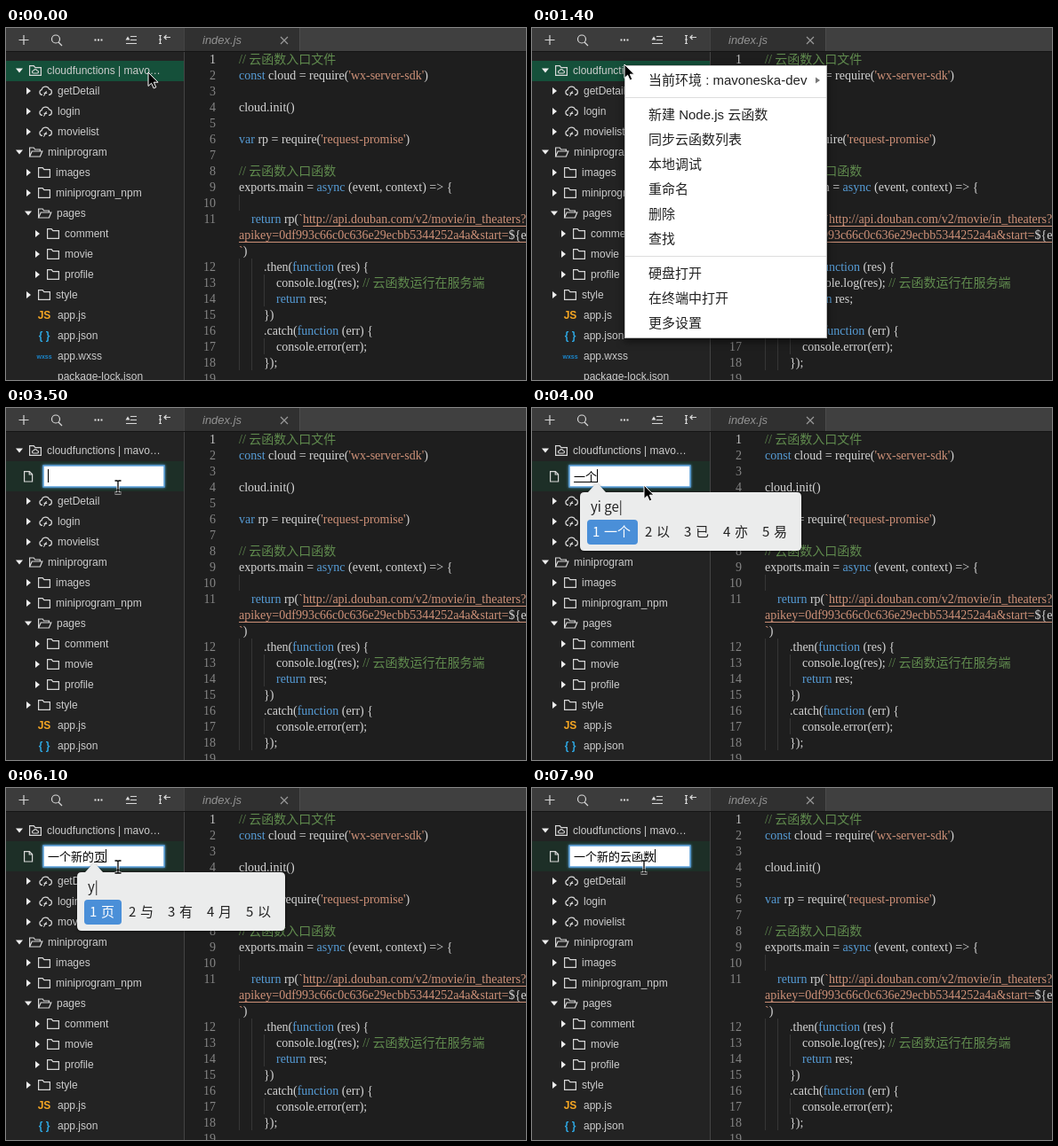
An HTML page that plays this animation: 585 by 397 pixels, repeating every 8000 ms.

```html
<!DOCTYPE html>
<html lang="zh">
<head>
<meta charset="utf-8">
<title>新建云函数</title>
<style>
html, body { margin: 0; width: 100%; height: 100%; overflow: hidden; background: #1e1e1e; }
svg { display: block; }
text { white-space: pre; }
.ui { font: 12px "Liberation Sans", "Noto Sans CJK SC", sans-serif; fill: #ccc; }
.code { font: 14px "Liberation Serif", "Noto Sans CJK SC", serif; fill: #d4d4d4; }
.num { fill: #858585; text-anchor: end; }
.comment { fill: #608b4e; }
.str { fill: #ce9178; }
.key { fill: #569cd6; }
.menu { font: 15px "Liberation Sans", "Noto Sans CJK SC", sans-serif; fill: #222; }
.ime { font: 15px "Noto Sans CJK SC", "Noto Sans CJK", "Noto Sans", sans-serif; fill: #222; }
.field { font: 13px "Noto Sans CJK SC", "Noto Sans CJK", sans-serif; fill: #000; }
.line { fill: none; stroke: #d8d8d8; stroke-width: 1.2; }
.on { fill: #fff; }
#menu > .panel { filter: drop-shadow(0 3px 5px #0009); }
#popup > .panel { filter: drop-shadow(0 1px 1.5px #0008); }
#input > .box { filter: drop-shadow(0 0 1.5px #5aa9e6); }
</style>
</head>
<body>
<svg width="585" height="397" viewBox="0 0 585 397">
  <defs>
    <g id="folder" class="line"><path d="M.6-5.4h4.6l1.6 2h6.6v8.8H.6z"/></g>
    <g id="open" class="line"><path d="M.6 5v-10h4.6l1.4 2h5.8v2M.6 5l2.6-6h11.6l-2.4 6z"/></g>
    <g id="cloud" class="line"><path d="M4 4.4H3.4a2.9 2.9 0 0 1-.2-5.7 4.3 4.3 0 0 1 8.3-.8 3.3 3.3 0 0 1 .3 6.5H11M5 5.5c2 0 1.6-5 4-5M5.6 2.4h3.6"/></g>
    <g id="cloudFolder" class="line"><path d="M.6-5.4h4.6l1.6 2h6.6v8.8H.6z"/><path d="M5 3a1.5 1.5 0 0 1 0-3 2.2 2.2 0 0 1 4 0 1.5 1.5 0 0 1 0 3z"/></g>
  </defs>

  <rect width="200" height="397" fill="#232323"/>
  <rect id="selected" y="37" width="200" height="23" fill="#15503a"/>
  <g id="head"></g>
  <g id="tree"></g>

  <g id="input">
    <rect y="60" width="200" height="34" fill="#1d2f27"/>
    <path class="line" d="M20.6 71.6h5.8l3.2 3.2v8.2h-9zM26.2 71.6v3.4h3.4"/>
    <rect class="box" x="42" y="65" width="136" height="24" fill="#fff" stroke="#5a9fd8" stroke-width="1.5"/>
    <text id="typed" class="field" x="47" y="82"></text>
    <rect id="underline" y="83" height="1"/>
    <rect id="caret" y="69" width="1" height="15"/>
  </g>

  <rect width="200" height="26" fill="#3c3c3c"/>
  <g class="line" stroke-width="1.3">
    <path d="M14.5 13.5h11M20 8v11M59 16l4 4"/>
    <circle cx="56" cy="12.5" r="4.5"/>
    <path d="M140 9.5h7M140 13.5h7M135 17.5h12"/>
    <path d="M172 8.5h3M172 13h3M172 17.5h3M173.5 8.5v9M178 10.5h7M180.5 8l-2.5 2.5 2.500 2.500"/>
  </g>
  <path d="M134.500 13.500l2.500-4 2.500 4zM99.500 12.500h2v2h-2zM103 12.500h2v2h-2zM106.500 12.500h2v2h-2z" fill="#ddd"/>

  <rect x="200" y="26" width="385" height="371" fill="#1e1e1e"/>
  <rect x="200" width="385" height="26" fill="#404040"/>
  <rect x="201" width="129" height="26" fill="#303030"/>
  <path d="M200.500 0V397" stroke="#444"/>
  <path d="M330.500 0V26" stroke="#4c4c4c"/>
  <path d="M0 26.500H585" stroke="#141414"/>
  <text class="ui" x="221" y="18" style="font-size:13px;font-style:italic;fill:#929292">index.js</text>
  <path d="M309 10l8 8m0-8l-8 8" stroke="#999" stroke-width="1.2"/>
  <path d="M262.500 188v18M262.500 260v126M276.500 260v126M290.500 278v36M290.500 350v18" stroke="#363636"/>
  <g id="code"></g>
  <path d="M334 223.500H585M262 241.500H585" stroke="#ce9178"/>

  <g id="menu">
    <rect class="panel" x="104.500" y="42.500" width="227" height="307" fill="#fff" stroke="#bbb"/>
    <path d="M105 78.500H331M105 257.500H331" stroke="#ddd"/>
    <rect id="hover" x="105" width="226" height="28" fill="#4a8fd8"/>
    <g id="items"></g>
    <path d="M319 55.500l5 3.500-5 3.500z" fill="#777"/>
  </g>

  <g id="popup"></g>

  <path id="arrow" d="M0 0V15.500L3.600 12.200 6.200 18 8.800 16.800 6.300 11.200H11z" fill="#000" stroke="#fff"/>
  <g id="beam" fill="none">
    <path d="M-3.500-7H-1Q0-7 0-6 0-7 1-7H3.500M0-6V6M-3.500 7H-1Q0 7 0 6 0 7 1 7H3.500M-1.500 3.500h3" stroke="#fff" stroke-width="3"/>
    <path d="M-3.500-7H-1Q0-7 0-6 0-7 1-7H3.500M0-6V6M-3.500 7H-1Q0 7 0 6 0 7 1 7H3.500M-1.500 3.500h3" stroke="#000" stroke-width="1.300"/>
  </g>
</svg>

<script>
const $ = id => document.getElementById(id);
const show = (id, on) => { $(id).style.display = on ? '' : 'none'; };
const label = (cls, x, y, s) => `<text class="${cls}" x="${x}" y="${y}">${s}</text>`;

// Sidebar
const triangle = (x, y, open) =>
  `<path d="${open ? `M${x - 4} ${y - 2.5}h8l-4 5z` : `M${x - 2} ${y - 4}v8l5-4z`}" fill="#eee"/>`;

const badge = (s, color, size) => (x, y) =>
  `<text x="43" y="${y + size * .36}" text-anchor="middle" font-family="Liberation Sans, sans-serif"
    font-weight="bold" font-size="${size}" fill="${color}">${s}</text>`;

const icon = name => (x, y) => `<use href="#${name}" x="${x}" y="${y}"/>`;
const folder = icon('folder'), openFolder = icon('open'), cloud = icon('cloud');

// name, icon, triangle x (0: none), open, icon x, text x
const rows = [
  ['cloudfunctions | mavo…', icon('cloudFolder'), 15, 1, 26, 46],
  ['getDetail', cloud, 25, 0, 37, 58],
  ['login', cloud, 25, 0, 37, 58],
  ['movielist', cloud, 25, 0, 37, 58],
  ['miniprogram', openFolder, 15, 1, 26, 47],
  ['images', folder, 25, 0, 36, 56],
  ['miniprogram_npm', folder, 25, 0, 36, 56],
  ['pages', openFolder, 25, 1, 36, 57],
  ['comment', folder, 35, 0, 46, 66],
  ['movie', folder, 35, 0, 46, 66],
  ['profile', folder, 35, 0, 46, 66],
  ['style', folder, 25, 0, 36, 56],
  ['app.js', badge('JS', '#f5a623', 12), 0, 0, 0, 58],
  ['app.json', badge('{ }', '#2ea6e0', 12), 0, 0, 0, 58],
  ['app.wxss', badge('wxss', '#1a86cc', 7), 0, 0, 0, 58],
  ['package-lock.json', () => '', 0, 0, 0, 58],
].map(([name, draw, tri, open, iconX, textX], i) => {
  const y = 48 + 23 * i;
  return (tri ? triangle(tri, y, open) : '') + draw(iconX, y) + label('ui', textX, y + 4, name);
});
$('head').innerHTML = rows[0];
$('tree').innerHTML = rows.slice(1).join('');

// Editor
const source = `// 云函数入口文件
const cloud = require('wx-server-sdk')

cloud.init()

var rp = require('request-promise')

// 云函数入口函数
exports.main = async (event, context) => {

    return rp(\`http://api.douban.com/v2/movie/in_theaters?
apikey=0df993c66c0c636e29ecbb5344252a4a&start=\${e
\`)
        .then(function (res) {
            console.log(res); // 云函数运行在服务端
            return res;
        })
        .catch(function (err) {
            console.error(err);
        });
`.split('\n');
const token = /(`http\S*|apikey=[^$]*|'[^']*'|`)|(\/\/ .*)|\b(const|var|async|return|function)\b/g;
const escapeHtml = s => s.replace(/&/g, '&amp;').replace(/>/g, '&gt;');
const paint = line => escapeHtml(line).replace(token, (s, str, comment) =>
  `<tspan class="${str ? 'str' : comment ? 'comment' : 'key'}">${s}</tspan>`);

let number = 0;
$('code').innerHTML = source.map((line, i) => {
  const y = 40 + 18 * i, text = line.trimStart();
  const wrapped = i === 11 || i === 12;
  if (!wrapped) number++;
  const gutter = wrapped ? '' :
    `<text class="code num" x="236" y="${y}"${i ? '' : ' style="fill:#c6c6c6"'}>${number}</text>`;
  return gutter + label('code', 262 + 3.5 * (line.length - text.length), y, paint(text));
}).join('');

// Context menu
const items = [
  ['当前环境 : mavoneska-dev', 59], ['新建 Node.js 云函数', 98], ['同步云函数列表', 126],
  ['本地调试', 154], ['重命名', 182], ['删除', 210], ['查找', 238],
  ['硬盘打开', 277], ['在终端中打开', 305], ['更多设置', 333],
];
$('items').innerHTML = items.map(([s, y]) => label('menu', 131, y + 5, s)).join('');

// Input method: time, committed text, preview, pinyin, popup left, candidates
const typing = [
  [0, ''],
  [3700, '', '一', 'yi', 28, '一 一个 以 已 亦'],
  [3900, '', '一个', 'yi g', 41, '一个 一共 一股 一国 一根'],
  [4000, '', '一个', 'yi ge', 54, '一个 以 已 亦 易'],
  [4200, '一个'],
  [4700, '一个', '想', 'x', 54, '想 小 下 学 新'],
  [4800, '一个', '新', 'xin', 67, '新 心 信 辛 欣'],
  [5200, '一个', '新的', 'xin d', 67, '新的 心得 心底 新店 新地'],
  [5400, '一个', '新的', 'xin de', 80, '新的 心得 新 心 信'],
  [5700, '一个新的'],
  [6100, '一个新的', '页', 'y', 80, '页 与 有 月 以'],
  [6200, '一个新的', '与', 'yu', 93, '与 于 鱼 雨 语'],
  [6400, '一个新的', '云', 'yun', 93, '云 运 晕 韵 允'],
  [6600, '一个新的', '云和', 'yun h', 93, '云和 运河 云海 运货 云华'],
  [6700, '一个新的', '云海', 'yun ha', 93, '云海 运好 云函 云和 韵涵'],
  [7000, '一个新的', '云函', 'yun han', 106, '云函 云含 韵涵 云涵 云汉'],
  [7100, '一个新的', '云函数', 'yun han s', 106, '云函数 云函 云涵 云汉 云'],
  [7200, '一个新的', '云函数', 'yun han shu', 106, '云函数 云函 云涵 云汉 云'],
  [7600, '一个新的云函数'],
];

// time, x, y, text cursor
const pointer = [
  [0, 160, 50], [100, 163, 108], [400, 156, 102], [500, 142, 88], [600, 127, 70],
  [700, 114, 54], [800, 107, 45], [900, 104, 41],
  [1700, 112, 50], [1800, 125, 64], [1900, 138, 82], [2000, 146, 95],
  [2900, 160, 88, 1], [3000, 172, 86, 1], [3300, 126, 89, 1],
  [3900, 126, 87], [4500, 126, 89, 1], [4800, 126, 87], [5900, 126, 89, 1],
  [6200, 126, 87], [7900, 126, 89, 1],
];
const at = (list, t) => list.findLast(entry => entry[0] <= t);

function drawPopup(pinyin, left, candidates) {
  let x = left + 8, cells = '';
  candidates.split(' ').forEach((word, i) => {
    const width = 29 + 15 * word.length, cls = i ? 'ime' : 'ime on';
    if (!i) cells += `<rect x="${x}" y="126" width="${width - 2}" height="28" rx="4" fill="#4a8fd8"/>`;
    cells += label(cls, x + 6, 145, i + 1) + label(cls, x + 19, 145, word);
    x += width;
  });
  const right = x + 6;
  return `<path class="panel" fill="#ebecec" d="M${left + 5} 95h4l10-11 10 11H${right - 5}q5 0 5 5V156q0 5-5 5
    H${left + 5}q-5 0-5-5V100q0-5 5-5z"/>` + label('ime', left + 12, 117, pinyin + '|') + cells;
}

let lastTyping;
function drawTyping(entry) {
  if (entry === lastTyping) return;
  lastTyping = entry;
  const [, done, preview = '', pinyin, left, candidates] = entry;
  const start = 47 + 13 * done.length, width = 13 * preview.length;
  $('typed').textContent = done + preview;
  $('underline').setAttribute('x', start);
  $('underline').setAttribute('width', width);
  $('caret').setAttribute('x', start + width);
  $('popup').innerHTML = preview && drawPopup(pinyin, left, candidates);
}

function drawMenu(t, y) {
  const open = t >= 1400 && t < 2300;
  show('menu', open);
  if (!open) return;
  const active = items.findIndex(([, c]) => y >= c - 14 && y < c + 14);
  show('hover', t >= 1700 && active >= 0);
  if (active >= 0) $('hover').setAttribute('y', items[active][1] - 14);
  [...$('items').children].forEach((el, i) =>
    el.setAttribute('class', t >= 1700 && i === active ? 'menu on' : 'menu'));
}

function render(t) {
  const editing = t >= 2500;
  show('selected', !editing);
  show('input', editing);
  show('caret', t < 3000 || t >= 3500);
  $('tree').setAttribute('transform', `translate(0 ${editing ? 34 : 0})`);
  drawTyping(at(typing, t));

  const [, x, y, beam] = at(pointer, t);
  drawMenu(t, y);
  show('arrow', !beam);
  show('beam', beam);
  $(beam ? 'beam' : 'arrow').setAttribute('transform', `translate(${x} ${y})`);
}

const begin = performance.now();
function tick() {
  render((performance.now() - begin) % 8000);
  requestAnimationFrame(tick);
}
tick();
</script>
</body>
</html>
```
